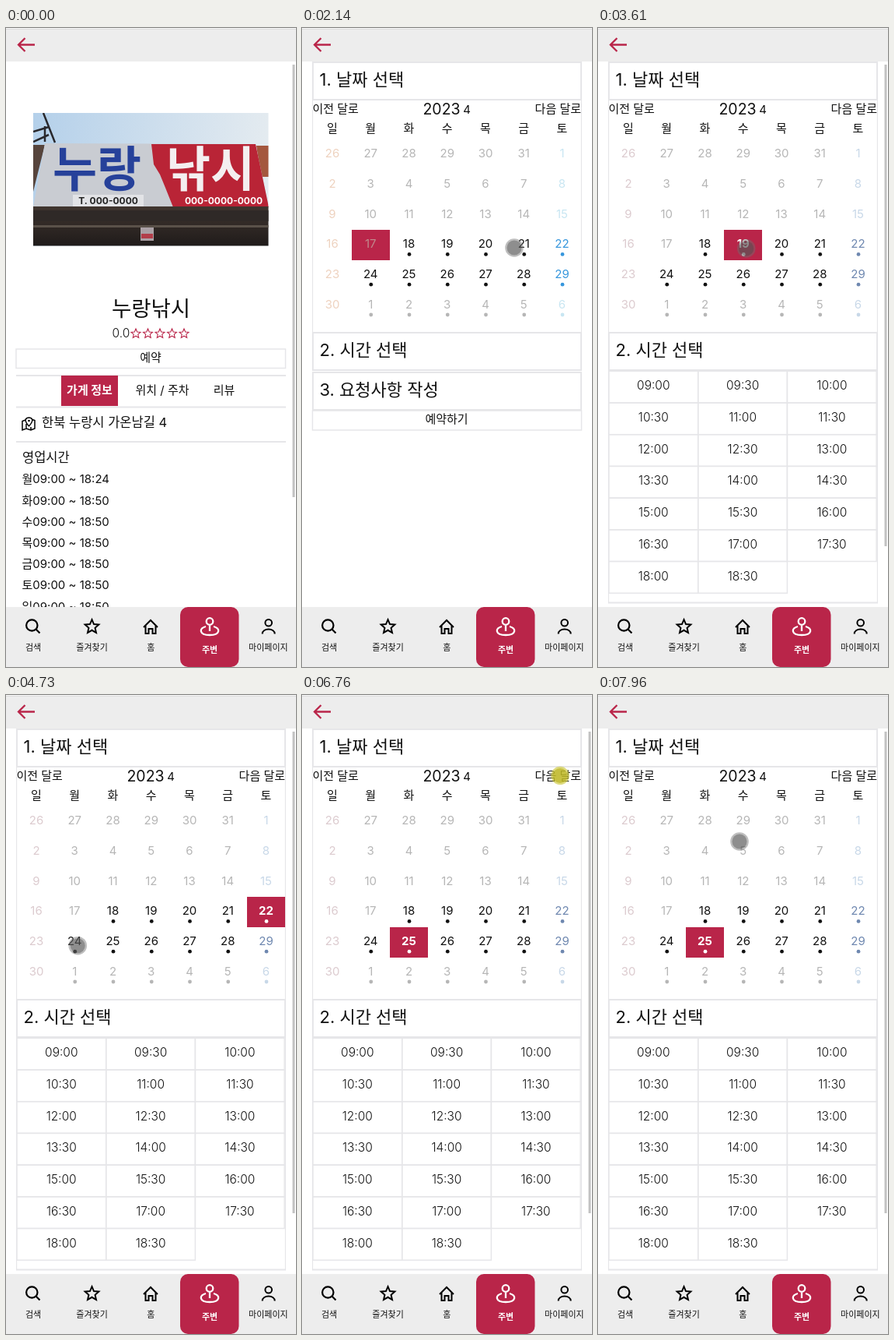
Recreate the animation shown at these times as an HTML page with a canvas. Size 373 by 820 pixels, loop 8000 ms.

```html
<!DOCTYPE html>
<html lang="ko">
<head>
<meta charset="utf-8">
<style>
html, body { margin: 0; width: 100%; height: 100%; overflow: hidden; background: #fff; }
canvas { display: block; width: 373px; height: 820px; }
</style>
</head>
<body>
<canvas></canvas>
<script>
const W = 373, H = 820, LOOP = 8000, PRESS = 70;
const RED = '#b92549', BAR = '#ededed', LINE = '#e6e6e9', INK = '#111', FADED = '#b6b6b6';
const FONT = "Inter, 'Noto Sans CJK KR', 'Noto Sans CJK', sans-serif";
const VIVID = { sunday: '#eed2bf', saturday: '#c8e6f2', openSaturday: '#3797dd' };
const MUTED = { sunday: '#dccbcf', saturday: '#c8d8e8', openSaturday: '#6f88b0' };

const canvas = document.querySelector('canvas');
const c = canvas.getContext('2d');
const dpr = window.devicePixelRatio || 1;
canvas.width = W * dpr;
canvas.height = H * dpr;

const columnX = col => 39 + col * 49.25;
const rowY = row => 160.5 + row * 38.8;
const at = (x, y) => ({ x, y });

// A finger resting on a day of April 2023, which starts on a Saturday.
const onDay = day => at(columnX((day + 5) % 7) + 4, rowY(Math.floor((day + 5) / 7)) + 6);

// Travel from `go` to `arrive`; a tap then ends at `up` and applies its effect.
const move = (go, arrive, place, up, effect) => ({ go, arrive, place, up, effect });
const pick = (go, arrive, up, day) => move(go, arrive, onDay(day), up, { picked: day });

const START = { page: 'shop', dates: false, times: false, month: 4, picked: 17 };
const MOVES = [
  move(190, 190, at(250, 545)),
  move(190, 520, at(187, 424), 700, { page: 'booking' }),
  move(900, 1110, at(100, 69), 1230, { dates: true }),
  move(1380, 2140, at(273, 282)),
  pick(2200, 2420, 2560, 18),
  move(2560, 2930, at(140, 418), 3080, { times: true }),
  pick(3150, 3400, 3610, 19),
  pick(3660, 3860, 3930, 20),
  pick(3930, 4130, 4200, 21),
  pick(4200, 4390, 4410, 22),
  pick(4480, 4730, 5190, 24),
  pick(5400, 5600, 5700, 25),
  move(5960, 6700, at(332, 103.5), 6830, { month: 5 }),
  move(7100, 7640, at(32, 103.5), 7830, { month: 4 }),
  move(7930, 7960, at(182, 188)),
];

const stateAt = t => Object.assign({}, START, ...MOVES.filter(m => m.up <= t).map(m => m.effect));

function text(s, x, y, size, { color = INK, align = 'center', weight = 400 } = {}) {
  c.font = `${weight} ${size}px ${FONT}`;
  c.textAlign = align;
  c.fillStyle = color;
  c.fillText(s, x, y + size * 0.365);
}

function rect(x, y, w, h, color) {
  c.fillStyle = color;
  c.fillRect(x, y, w, h);
}

function box(x, y, w, h, width = 1.5) {
  c.strokeStyle = LINE;
  c.lineWidth = width;
  c.strokeRect(x, y, w, h);
}

function disc(x, y, r, color) {
  c.fillStyle = color;
  c.beginPath();
  c.arc(x, y, r, 0, 7);
  c.fill();
}

function stroke(d, color = '#000', width = 2) {
  c.strokeStyle = color;
  c.lineWidth = width;
  c.stroke(new Path2D(d));
}

function fill(d, color) {
  c.fillStyle = color;
  c.fill(new Path2D(d));
}

function shade(x1, y1, x2, y2, from, to) {
  const g = c.createLinearGradient(x1, y1, x2, y2);
  g.addColorStop(0, from);
  g.addColorStop(1, to);
  return g;
}

function star(x, y, r, color, width) {
  c.beginPath();
  for (let i = 0; i < 10; i++) {
    const a = -Math.PI / 2 + i * Math.PI / 5, q = i % 2 ? r * 0.46 : r;
    c.lineTo(x + q * Math.cos(a), y + q * Math.sin(a));
  }
  c.closePath();
  c.strokeStyle = color;
  c.lineWidth = width;
  c.stroke();
}

function drawFrame() {
  rect(0, 0, W, 43, BAR);
  rect(0, 0, W, 1, '#f8f8f8');
  rect(0, 1, W, 1, '#dcdcdc');
  stroke('M37 21.5H16M24.5 13L16 21.5l8.5 8.5', RED, 2.3);

  rect(0, 743, W, 77, BAR);
  c.fillStyle = RED;
  c.beginPath();
  c.roundRect(224, 743, 75.5, 77, 10);
  c.fill();
  stroke('M40.5 766.5a7.2 7.2 0 1 1-14.4 0a7.2 7.2 0 1 1 14.4 0M38.5 771.5l5 5', '#000', 2.2);
  star(110.5, 768.5, 9.3, '#000', 2);
  stroke('M177 769l9-9 9 9M179.5 767v10h4v-6h5v6h4v-10');
  stroke('M266.3 761.5a4.3 4.3 0 1 1-8.6 0a4.3 4.3 0 1 1 8.6 0M262 766v8M257 768c-9 2-9 11 5 11s14-9 5-11', '#fff', 2.3);
  stroke('M342 763.3a4.3 4.3 0 1 1-8.6 0a4.3 4.3 0 1 1 8.6 0M329.7 777.5c0-8 16-8 16 0');
  ['검색', '즐겨찾기', '홈', '', '마이페이지'].forEach((s, i) => text(s, 35 + i * 75.6, 795, 11));
  text('주변', 262, 798, 11, { color: '#fff', weight: 700 });
}

function drawPhoto() {
  c.save();
  c.beginPath();
  c.rect(35, 109, 302.5, 170.5);
  c.clip();
  rect(35, 109, 303, 171, shade(35, 109, 337, 150, '#b4d0ea', '#e4ebf0'));
  stroke('M48 109l15 38M35 133l20-6M35 146l20-9M50 126v20', '#29282c', 2.5);
  fill('M322 151h16v40h-10z', '#a4573e');
  fill('M35 150h15L35 210z', '#56443c');
  fill('M50 148L321 149 338 230H35z', '#c9ccd2');
  fill('M187 149H321L338 230H215L205 205 198 188 190 175z', '#b92436');
  rect(35, 229, 303, 51, shade(0, 229, 0, 280, '#40352f', '#1f1b1a'));
  rect(35, 234, 303, 14, '#2f2927');
  rect(35, 253, 303, 3, '#5a5149');
  rect(173, 256, 17, 17, '#aaa0a5');
  rect(174, 264, 15, 6, '#b23e4a');
  text('누랑', 117, 181, 62, { color: '#26419a', weight: 900 });
  text('낚시', 263, 181, 62, { color: '#f4eff0', weight: 900 });
  rect(86, 214, 91, 15, '#e2e3e6');
  text('T. 000-0000', 131.5, 221.5, 12, { weight: 700, color: '#222' });
  text('000-0000-0000', 280, 221.5, 12, { weight: 700, color: '#fff' });
  c.restore();
}

function scrollbar(bottom) {
  rect(368.5, 47, 3, bottom - 47, '#c1c1c1');
}

function drawShop() {
  const left = { align: 'left' };
  drawPhoto();
  text('누랑낚시', 186.5, 360, 27.5, { weight: 300 });
  text('0.0', 136.5, 391, 15.5, { align: 'left', weight: 300 });
  for (let i = 0; i < 5; i++) star(167 + i * 15.5, 392.3, 6.3, RED, 1.1);
  box(13, 412, 346.5, 24.5);
  text('예약', 186, 423, 15);
  for (const y of [446, 486.5, 531]) rect(13, y - 1, 347, 2, LINE);
  rect(71, 446, 73, 39, RED);
  text('가게 정보', 107.5, 465, 15, { color: '#fff', weight: 700 });
  text('위치 / 주차', 201, 465, 15);
  text('리뷰', 280.5, 465, 15);
  stroke('M25 503l-4 1.5V516l5-2 6 2 5-2v-10.5l-3-1M26 508v6M32 512v4M29.5 511c-8-9-3-11 0-11s8 2 0 11', '#000', 1.5);
  disc(29.5, 504, 1.3, '#000');
  text('한북 누랑시 가온남길 4', 46, 506, 16.5, left);
  text('영업시간', 21, 551, 16.5, left);
  [...'월화수목금토일'].forEach((d, i) =>
    text(`${d}09:00 ~ 18:${i ? 50 : 24}`, 20.5, 579 + i * 27.2, 15, left));
  scrollbar(602);
}

function section(title, y) {
  box(14, y + 1, 345, 48, 2);
  text(title, 22.5, y + 23, 22, { align: 'left' });
}

function sides(y, h) {
  rect(13, y, 1.2, h, LINE);
  rect(358.8, y, 1.2, h, LINE);
}

function drawDay(date, col, row, { month, picked, times }) {
  const m = date.getMonth() + 1, day = date.getDate();
  const x = columnX(col), y = rowY(row);
  const tint = times ? MUTED : VIVID;
  const open = col > 0 && m * 100 + day > 417;
  const live = open && m === month;
  const chosen = m === 4 && m === month && day === picked;
  let color = live ? INK : FADED;
  if (col === 0) color = tint.sunday;
  if (col === 6) color = live ? tint.openSaturday : tint.saturday;
  if (chosen) {
    rect(Math.round(x - 24.5), Math.round(y - 17.5), 49, 39, RED);
    color = open ? '#fff' : '#c0898c';
  }
  text(day, x, y, 15, { color, weight: chosen && open ? 700 : 400 });
  if (open) disc(x + 0.5, y + 13.5, 2.4, color);
}

function drawCalendar(state) {
  sides(92, 298);
  text('이전 달로', 13.5, 104, 15, { align: 'left' });
  text('다음 달로', 359, 104, 15, { align: 'right' });
  text('2023', 179.5, 104, 19.5);
  text(state.month, 212, 105, 15);
  [...'일월화수목금토'].forEach((d, col) => text(d, columnX(col), 129, 15));
  const lead = new Date(2023, state.month - 1, 1).getDay();
  for (let i = 0; i < 42; i++) {
    drawDay(new Date(2023, state.month - 1, 1 - lead + i), i % 7, Math.floor(i / 7), state);
  }
}

function drawTimes(picked) {
  sides(440, 298);
  rect(13, 736.5, 347, 2, LINE);
  const slots = picked === 24 ? 19 : 20; // Mondays close early
  for (let i = 0; i < slots; i++) {
    const col = i % 3, y = 440.3 + Math.floor(i / 3) * 40.7;
    const hour = String(9 + (i >> 1)).padStart(2, '0');
    box(14 + col * 114.7, y, 114.7, 40.7);
    text(`${hour}:${i % 2 ? '30' : '00'}`, 71.3 + col * 114.8, y + 18.4, 15.5, { weight: 300 });
  }
}

function drawBooking(state) {
  const shift = state.dates ? 297 : 0;
  section('1. 날짜 선택', 43);
  if (state.dates) drawCalendar(state);
  section('2. 시간 선택', 93 + shift);
  if (state.times) {
    drawTimes(state.picked);
    scrollbar(665);
    return;
  }
  section('3. 요청사항 작성', 144 + shift);
  box(13.5, 194 + shift, 346, 25);
  text('예약하기', 186, 205 + shift, 15);
}

function drawPointer(t) {
  const i = MOVES.findLastIndex(m => m.go <= t);
  if (i < 0) return;
  const { go, arrive, place } = MOVES[i];
  const from = MOVES[Math.max(i - 1, 0)].place;
  const k = Math.min(1, (t - go) / (arrive - go || 1));
  const e = k * k * (3 - 2 * k);
  const x = from.x + (place.x - from.x) * e, y = from.y + (place.y - from.y) * e;
  const pressed = MOVES.some(m => t >= m.up - PRESS && t < m.up);
  disc(x, y, 11.8, pressed ? 'rgba(205,200,60,.65)' : 'rgba(110,110,110,.45)');
  disc(x, y, 9.5, pressed ? 'rgba(185,178,30,.65)' : 'rgba(70,70,70,.4)');
}

function render() {
  const t = performance.now() % LOOP;
  const state = stateAt(t);
  c.setTransform(dpr, 0, 0, dpr, 0, 0);
  rect(0, 0, W, H, '#fff');
  if (state.page === 'shop') drawShop();
  else drawBooking(state);
  drawFrame();
  drawPointer(t);
  requestAnimationFrame(render);
}
render();
</script>
</body>
</html>
```
